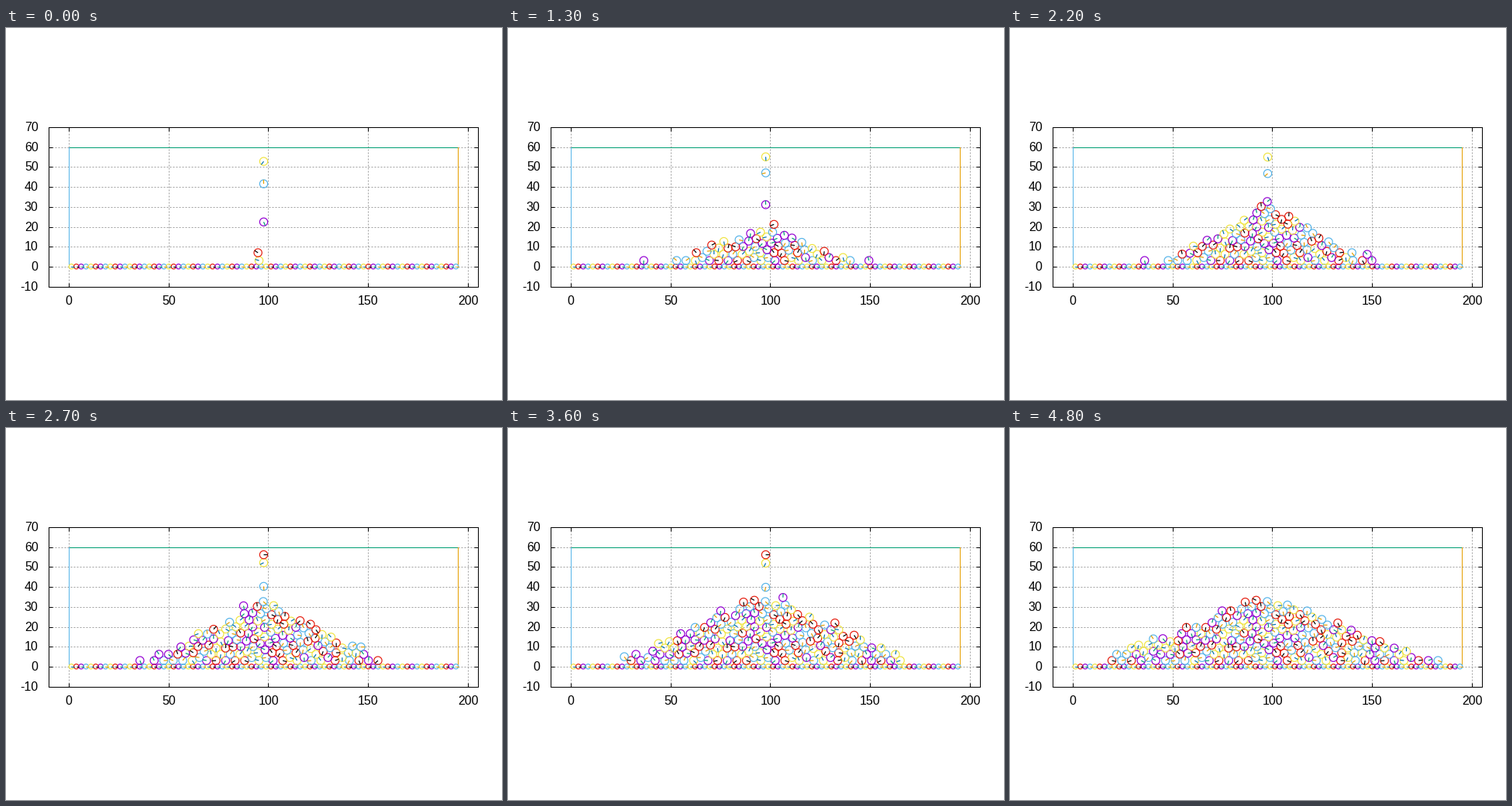
A matplotlib script that plays this animation: 640x480 px, repeating every 4900 ms.

```python
import numpy as np
import matplotlib.pyplot as plt
from matplotlib.animation import FuncAnimation
from matplotlib.collections import LineCollection
from matplotlib.transforms import Affine2D

W, H, DPI = 640, 480, 100
PX = 72 / DPI                     # one pixel in points
FRAMES, STEP = 49, 100

WIDTH, TOP = 195, 60              # container
N_FLOOR, N_BALLS = 80, 200
R_FLOOR, R = WIDTH / N_FLOOR / 2, 2.0
X0, Y0 = WIDTH / 2, 56            # drop point
HALF_G = 3.95                     # units per squared drop interval
BALL_AREA = 16                    # heap area taken by one ball

PURPLE, GREEN, SKY, ORANGE = "#9400d3", "#009e73", "#56b4e9", "#e69f00"
YELLOW, BLUE, RED, BLACK = "#f0e442", "#0072b2", "#e51e10", "#000000"
RIMS = [YELLOW, RED, PURPLE, SKY]
SPOKES = [BLUE, BLACK, GREEN, ORANGE]

plt.rcParams["font.family"] = "Liberation Sans"
rng = np.random.default_rng(7)


def outline(n, x):
    """Triangular heap whose area grows with the number of balls."""
    half = min(50, 6 + 3 * n) + 45 * (n / N_BALLS) ** 3
    return BALL_AREA * (n + 1) / half * (1 - abs(x - X0) / half)


def cap(xs, x, y, reach):
    """Lowest centre height of a ball resting on a body at (x, y)."""
    d2 = reach ** 2 - (xs - x) ** 2
    return np.where(d2 > 0, y + np.sqrt(np.maximum(d2, 0)), 0)


floor_x = (np.arange(N_FLOOR) + 0.5) * 2 * R_FLOOR


def build_heap():
    """Put each ball in the hollow that lies deepest below the outline."""
    xs = np.linspace(2, 193, 3821)
    env = np.max([cap(xs, x, 0, R + R_FLOOR) for x in floor_x], axis=0)
    sites, paths = [], []
    for n in range(N_BALLS):
        paths.append(env.copy())
        mid = env[1:-1]
        pits = 1 + np.flatnonzero((mid <= env[:-2]) & (mid <= env[2:]))
        lack = outline(n, xs[pits]) - env[pits] + rng.exponential(1, len(pits))
        k = pits[np.argmax(lack)]
        sites.append((xs[k], env[k]))
        env = np.maximum(env, cap(xs, xs[k], env[k], 1.975 * R))
    return xs, np.array(sites), paths


XS, SITES, PATHS = build_heap()
SPIN = rng.uniform(-3, 3, N_BALLS)


def ball_state(n, age, spread):
    """Free fall, then a roll along the surface into the resting place."""
    sx, sy = SITES[n]
    land = np.interp(X0, XS, PATHS[n])
    fall = np.sqrt((Y0 - land) / HALF_G)
    if age < fall:
        return X0, Y0 - HALF_G * age ** 2, SPIN[n] * age
    u = min((age - fall) / (0.5 + 0.05 * abs(sx - X0)), 1)
    x = X0 + (sx - X0) * u * u * (3 - 2 * u)
    y = np.interp(x, XS, PATHS[n]) if u < 1 else sy
    x = X0 + (x - X0) * spread
    return x, y, SPIN[n] * fall - (x - X0) / R


fig = plt.figure(figsize=(W / DPI, H / DPI), dpi=DPI, facecolor="white")
ax = fig.add_axes([55.05 / W, 146.2 / H, 554 / W, 206 / H])
ax.set(xlim=(-10, 205), ylim=(-10, 70),
       xticks=range(0, 201, 50), yticks=range(-10, 71, 10))
ax.tick_params(direction="in", top=True, right=True, length=5 * PX, width=PX,
               labelbottom=False, labelleft=False)
ax.set_axisbelow(True)
ax.grid(color="#a0a0a0", lw=PX, ls=(0, (2, 2)))
for spine in ax.spines.values():
    spine.set_linewidth(PX)

SCALE = 554 / 215                 # pixels per unit


def label(x, y, value, dx, dy, ha):
    ax.text(x + dx / SCALE, y + dy / SCALE, str(value), size=16 * PX,
            ha=ha, va="baseline")


for v in range(0, 201, 50):
    label(v, -10, v, 0.2, -23.5, "center")
for v in range(-10, 71, 10):
    label(-10, v, v, -13.35, -5, "right")

ax.plot([0, WIDTH], [TOP, TOP], color=GREEN, lw=PX)
ax.plot([0, 0], [0, TOP], color=SKY, lw=PX)
ax.plot([WIDTH, WIDTH], [0, TOP], color=ORANGE, lw=PX)

# Balls sit on pixel centres, like the snapped lines
to_pixels = ax.transData + Affine2D().translate(0.45, 0.3)
rims, spokes = (LineCollection([], linewidths=1.2 * PX, zorder=z,
                               transform=to_pixels) for z in (3, 3.1))
ax.add_collection(rims, autolim=False)
ax.add_collection(spokes, autolim=False)

turn = np.linspace(0, 2 * np.pi, 33)
CIRCLE = np.column_stack([np.cos(turn), np.sin(turn)])
FLOOR = [(x, 0, 0, R_FLOOR) for x in floor_x]


def draw(f):
    clock = 4.92 + 4.892 * f      # in drop intervals
    spread = 0.95 + 0.05 * f / (FRAMES - 1)
    count = min(N_BALLS, int(clock) + 1)
    bodies = FLOOR + [(*ball_state(n, clock - n, spread), R) for n in range(count)]
    x, y, a, r = np.array(bodies).T
    centre = np.column_stack([x, y])
    tip = centre + r[:, None] * np.column_stack([np.cos(a), np.sin(a)])
    rims.set_segments(list(centre[:, None] + r[:, None, None] * CIRCLE))
    spokes.set_segments(list(np.stack([centre, tip], axis=1)))
    rims.set_color([RIMS[i % 4] for i in range(len(bodies))])
    spokes.set_color([SPOKES[i % 4] for i in range(len(bodies))])
    return rims, spokes


anim = FuncAnimation(fig, draw, frames=FRAMES, interval=STEP, repeat=True)
plt.show()
```
